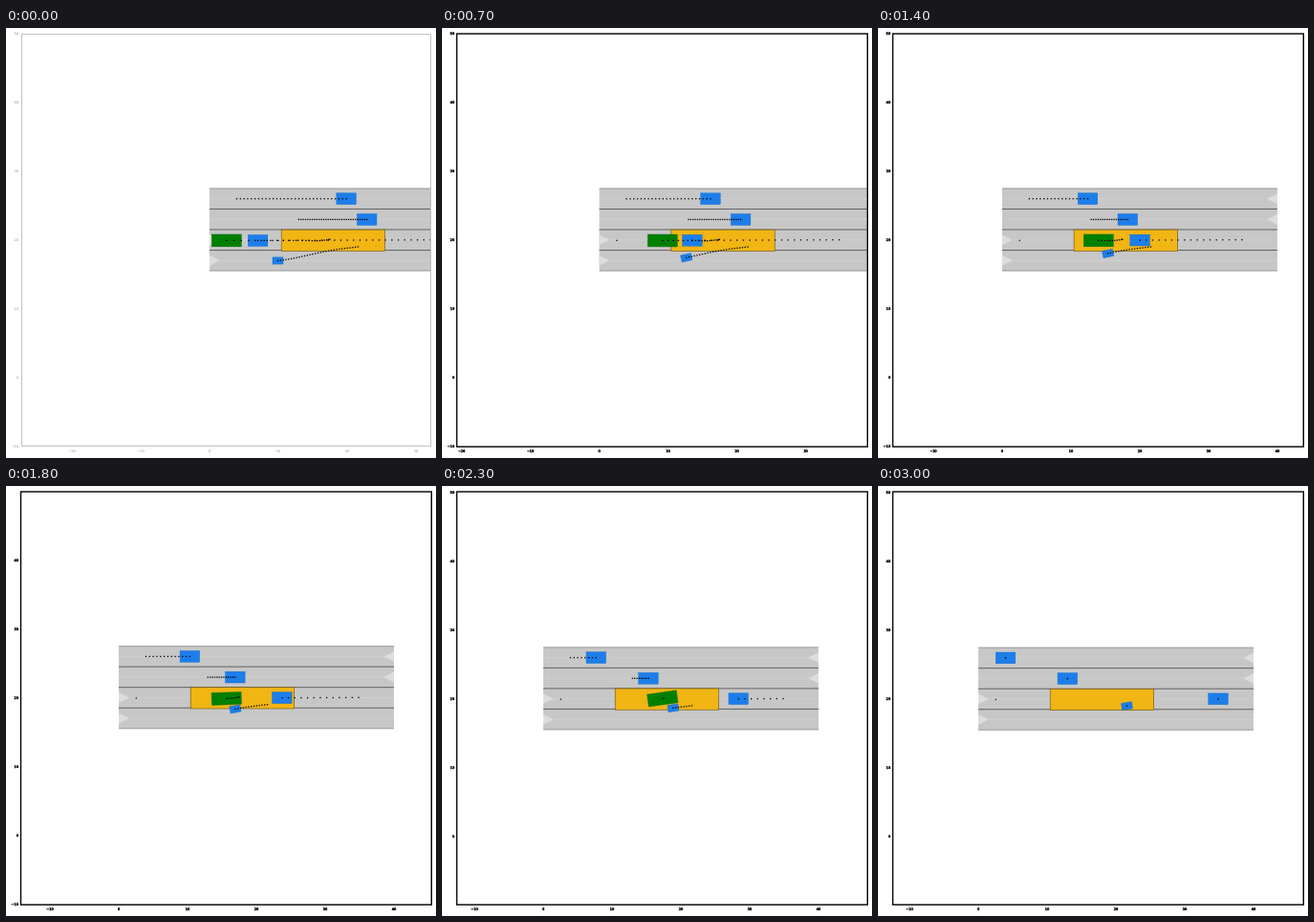
Recreate the animation shown at these times as an HTML page with a canvas. Size 450 by 450 pixels, loop 3.1 s.

```html
<!DOCTYPE html>
<html lang="en">
<head>
<meta charset="utf-8">
<title>Lane traffic</title>
<style>
  html, body { margin: 0; width: 100%; height: 100%; overflow: hidden; background: #fff; }
  canvas { display: block; width: 450px; height: 450px; }
</style>
</head>
<body>
<canvas id="stage" width="450" height="450"></canvas>
<script>
const ctx = document.getElementById('stage').getContext('2d');
const STEPS = 31, STEP_MS = 100, EGO_END = 24;
const SCALE = 7.2, LANE = 21.55, ROAD = 40 * SCALE, ROAD_TOP = 167.9;
const VIEW = { left: 15.5, top: 6, right: 445.3, bottom: 438.2 };

// Smooth curve through [step, value] points
function curve(points) {
  const slope = i => {
    const a = points[Math.max(i - 1, 0)], b = points[Math.min(i + 1, points.length - 1)];
    return (b[1] - a[1]) / (b[0] - a[0]);
  };
  return k => {
    let i = 0;
    while (i < points.length - 2 && k > points[i + 1][0]) i++;
    const [k0, v0] = points[i], [k1, v1] = points[i + 1];
    const h = k1 - k0, u = Math.min((k - k0) / h, 1), w = 1 - u;
    return v0 * w * w * (1 + 2 * u) + v1 * u * u * (3 - 2 * u)
      + h * u * w * (w * slope(i) - u * slope(i + 1));
  };
}

const egoX = curve([[0, 17.5], [4, 47.5], [10, 82.5], [14, 100.6], [18, 112.5], [23, 124.5], [24, 125.5]]);
const egoRise = curve([[0, 0], [14, 0], [18, -0.3], [23, 0.9], [24, 1.2]]);
const egoTurn = curve([[0, 0], [14, 0], [18, -2], [23, -8], [24, -9]]);
const bikeY = curve([[0, 243.5], [4, 242], [10, 238.5], [14, 236], [18, 233.7], [23, 231.4], [30, 229]]);
const bikeTurn = curve([[0, 0], [4, -10], [10, -13.5], [14, -12], [18, -10], [23, -8], [30, -8]]);

const straight = () => 0;
const cars = [
  { x: k => 143.1 - 3.82 * k, y: () => 178.7, turn: straight, w: 20.5, h: 11.8 },
  { x: k => 164.7 - 2.38 * k, y: () => 200.4, turn: straight, w: 20.5, h: 11.8 },
  { x: k => 50.6 + 6.68 * k, y: k => 222.4 - k * 0.025, turn: straight, w: 20.5, h: 11.8 },
  { x: k => 71.5 + 2.8 * k, y: bikeY, turn: bikeTurn, w: 11, h: 7.2 }
];
const ego = { x: k => egoX(k) + 0.3, y: k => 222.4 - egoRise(k), turn: egoTurn, w: 31, h: 12.9 };

function line(x1, y1, x2, y2, color, width) {
  ctx.strokeStyle = color;
  ctx.lineWidth = width;
  ctx.beginPath();
  ctx.moveTo(x1, y1);
  ctx.lineTo(x2, y2);
  ctx.stroke();
}

function dot(x, y, color = '#000') {
  ctx.fillStyle = color;
  ctx.fillRect(x - 0.65, y - 0.65, 1.3, 1.3);
}

function vehicle(v, k, fill, edge) {
  ctx.save();
  ctx.translate(v.x(k), v.y(k));
  ctx.rotate(v.turn(k) * Math.PI / 180);
  ctx.fillStyle = fill;
  ctx.fillRect(-v.w / 2, -v.h / 2, v.w, v.h);
  ctx.strokeStyle = edge;
  ctx.lineWidth = 0.4;
  ctx.strokeRect(-v.w / 2, -v.h / 2, v.w, v.h);
  ctx.restore();
}

function trail(v, from, to) {
  for (let k = from; k <= to; k++) dot(v.x(k), v.y(k));
}

function road() {
  ctx.fillStyle = '#c7c7c7';
  ctx.fillRect(0, ROAD_TOP, ROAD, LANE * 4);
  for (let i = 0; i < 4; i++) {
    const top = ROAD_TOP + i * LANE, mid = top + LANE / 2;
    line(0, mid, ROAD, mid, '#ddd', 0.35);
    const start = i < 2 ? ROAD : 0, tip = i < 2 ? ROAD - 10.8 : 10.8;
    ctx.fillStyle = '#ddd';
    ctx.beginPath();
    ctx.moveTo(start, mid - 5.4);
    ctx.lineTo(tip, mid);
    ctx.lineTo(start, mid + 5.4);
    ctx.fill();
    line(0, top, ROAD, top, '#555', i ? 0.9 : 0.5);
  }
  line(0, ROAD_TOP + 4 * LANE, ROAD, ROAD_TOP + 4 * LANE, '#555', 0.5);
}

function goal() {
  ctx.fillStyle = '#f1b514';
  ctx.fillRect(75.2, 211.1, 108.4, 22.2);
  ctx.strokeStyle = '#6b5010';
  ctx.lineWidth = 0.6;
  ctx.strokeRect(75.2, 211.1, 108.4, 22.2);
}

function label(value, x, y, bold) {
  const text = String(value).replace('-', '\u2212');
  ctx.fillText(text, x, y);
  if (bold) ctx.strokeText(text, x, y);
}

function axes(originX, rise, bold) {
  const { left, top, right, bottom } = VIEW;
  ctx.strokeStyle = bold ? '#000' : '#bbb';
  ctx.lineWidth = bold ? 1.4 : 0.9;
  if (bold) ctx.strokeRect(left, top, right - left, bottom - top);
  else ctx.strokeRect(16.5, 6.5, 428, 431);

  ctx.font = '3.5px "DejaVu Sans", sans-serif';
  ctx.textBaseline = 'middle';
  ctx.fillStyle = bold ? '#000' : '#888';
  ctx.strokeStyle = '#000';
  ctx.lineWidth = 0.5;
  ctx.textAlign = 'center';
  for (let v = -20; v <= 40; v += 10) {
    const x = originX + v * SCALE;
    if (x > left && x < right) label(v, x, 442.6, bold);
  }
  ctx.textAlign = 'right';
  for (let v = -10; v <= 50; v += 10) {
    const y = 366 - v * SCALE + rise;
    if (y > 5.8 && y < 438.1) label(v, 12.9, y + 0.3, bold);
  }
}

function draw(k) {
  const egoStep = Math.min(k, EGO_END);
  const originX = 230.5 - egoX(egoStep), rise = egoRise(egoStep);
  ctx.fillStyle = '#fff';
  ctx.fillRect(0, 0, 450, 450);

  ctx.save();
  ctx.beginPath();
  ctx.rect(VIEW.left, VIEW.top, VIEW.right - VIEW.left - 0.5, VIEW.bottom - VIEW.top);
  ctx.clip();
  ctx.translate(originX, rise);
  road();
  goal();
  dot(18.3, 222.3, '#00007a');
  for (const car of cars) vehicle(car, k, '#1d7eea', '#0066cc');
  if (k <= EGO_END) vehicle(ego, k, '#008000', '#006400');
  for (const car of cars) trail(car, k, STEPS - 1);
  trail(ego, k, EGO_END);
  ctx.restore();

  axes(originX, rise, k > 0);
}

const startTime = performance.now();
function tick() {
  draw(Math.floor((performance.now() - startTime) / STEP_MS) % STEPS);
  requestAnimationFrame(tick);
}
tick();
</script>
</body>
</html>
```
